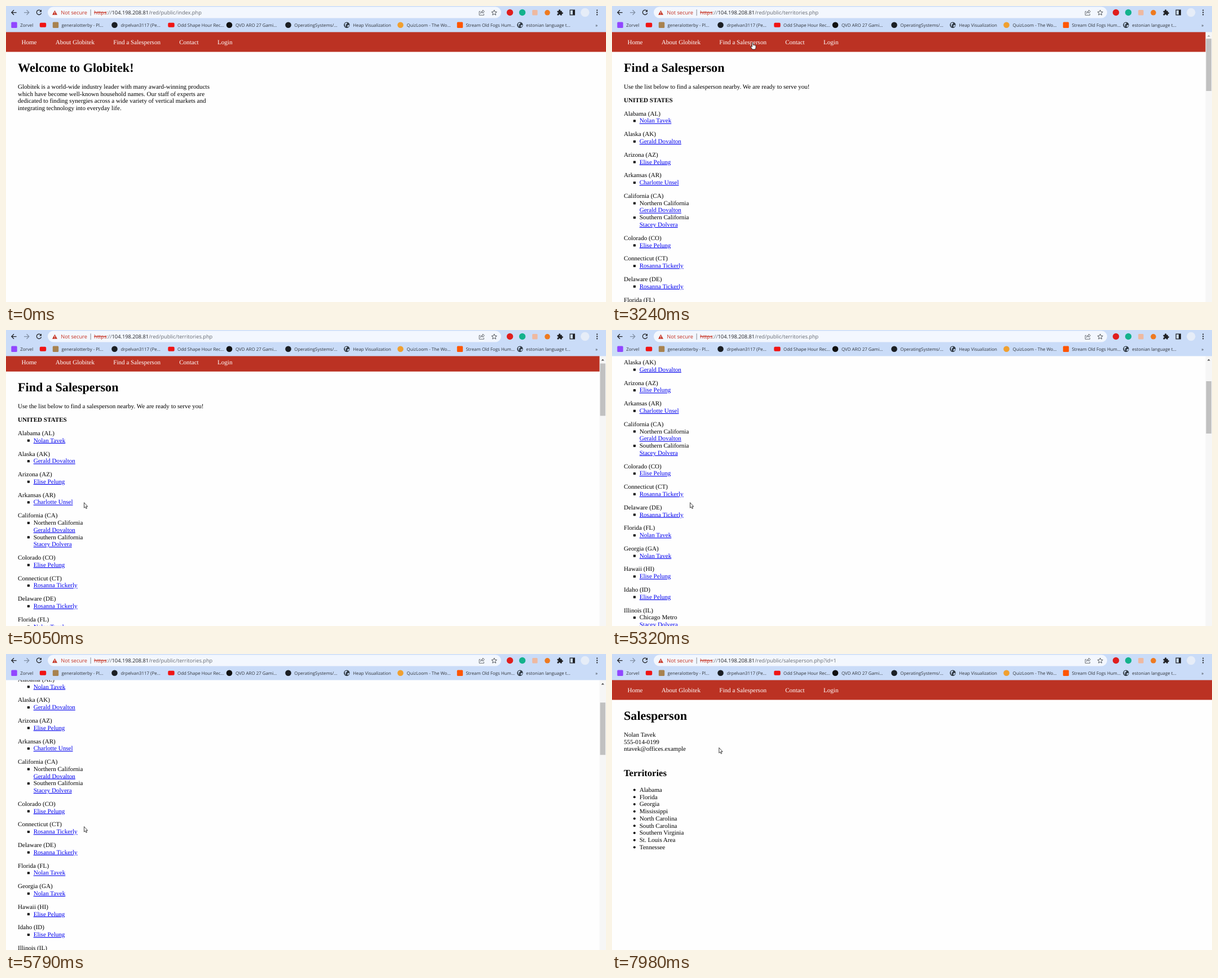
An HTML page that plays this animation: 1064 px wide and 526 px high, repeating every 8 s.

```html
<!DOCTYPE html>
<html lang="en">
<head>
<meta charset="utf-8">
<title>Find a Salesperson</title>
<style>
  html, body { margin: 0; width: 100%; height: 100%; overflow: hidden; background: #fefefe; }
  svg { display: block; width: 1064px; height: 526px; text-rendering: geometricPrecision; }
  .page { font: 11.083px "Liberation Serif", "Times New Roman", serif; }
  .h1 { font-size: 22.167px; font-weight: 700; }
  .h2 { font-size: 16.625px; font-weight: 700; }
  .b { font-weight: 700; }
  .nav { fill: #fff; }
  .link { fill: #00e; text-decoration: underline; }
  .bar { font: 9.25px "Open Sans", "Noto Sans", sans-serif; }
  .mark { font-size: 7.9px; fill: #30343a; }
  .line { fill: none; stroke: #202124; stroke-width: 1.25; }
  .cursor { fill: #fff; stroke: #111; stroke-width: .8; stroke-linejoin: round; }
</style>
</head>
<body>
<svg id="stage" viewBox="0 0 1064 526"></svg>
<script>
const LINE = 12.746, GAP = 11.083, LOOP = 8000;
const text = (x, y, s, c = '') => `<text x="${x}" y="${y}" class="${c}">${s}</text>`;
const rect = (x, y, w, h, fill, r = 0) =>
  `<rect x="${x}" y="${y}" width="${w}" height="${h}" rx="${r}" fill="${fill}"/>`;
const dot = (x, y, r, fill) => `<circle cx="${x}" cy="${y}" r="${r}" fill="${fill}"/>`;
const path = (d, attrs = 'class="line"') => `<path d="${d}" ${attrs}/>`;
const group = (id, body, c = '') => `<g id="${id}" class="${c}">${body}</g>`;

// Web pages
const navItems = [[27.4, 'Home'], [87.7, 'About Globitek'], [190.3, 'Find a Salesperson'],
  [307.2, 'Contact'], [375, 'Login']];
const header = title => rect(0, 46, 1064, 35.5, '#bb3223') +
  navItems.map(([x, s]) => text(x, 68.4, s, 'nav')).join('') + text(21, 116.7, title, 'h1');
const lines = (x, y, rows) => rows.map((s, i) => text(x, y + i * LINE, s)).join('');

const homePage = header('Welcome to Globitek!') + lines(21, 147, [
  'Globitek is a world-wide industry leader with many award-winning products',
  'which have become well-known household names. Our staff of experts are',
  'dedicated to finding synergies across a wide variety of vertical markets and',
  'integrating technology into everyday life.']);

const [nolan, gerald, elise, charlotte, stacey, rosanna] = ['Nolan Tavek', 'Gerald Dovalton',
  'Elise Pelung', 'Charlotte Unsel', 'Stacey Dolvera', 'Rosanna Tickerly'];
const states = [
  ['Alabama (AL)', nolan], ['Alaska (AK)', gerald], ['Arizona (AZ)', elise],
  ['Arkansas (AR)', charlotte],
  ['California (CA)', ['Northern California', gerald], ['Southern California', stacey]],
  ['Colorado (CO)', elise], ['Connecticut (CT)', rosanna], ['Delaware (DE)', rosanna],
  ['Florida (FL)', nolan], ['Georgia (GA)', nolan], ['Hawaii (HI)', elise], ['Idaho (ID)', elise],
  ['Illinois (IL)', ['Chicago Metro', stacey], ['Southern Illinois', nolan]],
  ['Indiana (IN)', stacey]];

function stateList() {
  let y = 194.7, out = '';
  for (const [name, ...areas] of states) {
    out += text(21, y, name);
    for (const area of areas) {
      out += rect(37.9, y + LINE - 5.2, 4, 4, '#000');
      if (Array.isArray(area)) out += text(48.7, y += LINE, area[0]);
      out += text(48.7, y += LINE, Array.isArray(area) ? area[1] : area, 'link');
    }
    y += LINE + GAP;
  }
  return out;
}
const listPage = header('Find a Salesperson') +
  text(21, 147, 'Use the list below to find a salesperson nearby. We are ready to serve you!') +
  text(21, 170.8, 'UNITED STATES', 'b') + stateList();

const areas = ['Alabama', 'Florida', 'Georgia', 'Mississippi', 'North Carolina', 'South Carolina',
  'Southern Virginia', 'St. Louis Area', 'Tennessee'];
const personPage = header('Salesperson') +
  lines(21, 147, [nolan, '555-014-0199', 'ntavek@offices.example']) +
  text(21, 217, 'Territories', 'h2') + lines(48.7, 244.8, areas) +
  areas.map((_, i) => dot(39.8, 241.5 + i * LINE, 2, '#000')).join('');

const scrollbar = rect(1052.5, 46, 11.5, 480, '#f6f6f6') +
  path('M1055.6 54.4L1058.2 51.6 1060.8 54.4Z', 'id="up" fill="#505050"') +
  '<rect id="thumb" x="1053.5" y="58" width="9.4" height="93" fill="#c1c1c1"/>';

// Browser bar
const globe = x => dot(x, 33.8, 5.2, '#303a44') +
  path(`M${x - 3.6} 31.6q2-2.6 4.4-1.6l-1 2.2-2 1 1 1.8-1.4 2.2zM${x + 1.2} 34.4l2.8-1 .4 1.6-2 2.6-1.4-1z`,
    'fill="#cadcf8"');
const square = (x, fill) => rect(x - 5.2, 28.6, 10.4, 10.4, fill, 1.5);
const play = x => rect(x - 5.7, 29.8, 11.4, 8, '#f01414', 2);
const disc = fill => x => dot(x, 33.8, 5.3, fill);
const marks = [
  [14.5, x => square(x, '#9146ff'), 25.3, 'Zorvel'], [65.5, play, 76, ''],
  [88, x => square(x, '#a8824f'), 98.5, 'generalotterby - Pl...'],
  [192.5, disc('#1b1f24'), 203.5, 'drpelvan3117 (Pe...'],
  [293, play, 304, 'Odd Shape Hour Rec...'], [396, disc('#111'), 407, 'QVD ARO 27 Gami...'],
  [500.5, disc('#1b1f24'), 511.3, 'OperatingSystems/...'], [604.3, globe, 615.2, 'Heap Visualization'],
  [699.5, disc('#f0a030'), 710.5, 'QuizLoom - The Wo...'],
  [805, x => square(x, '#ff5500'), 815.5, 'Stream Old Fogs Hum...'],
  [911.5, globe, 922.3, 'estonian language t...']];

const bar = rect(0, 0, 1064, 46.4, '#cadcf8') + rect(74, 1.5, 804, 20, '#f3f7fe', 10) +
  path('M18.6 11.5H10M14 7.3L9.8 11.5 14 15.7') +
  path('M32 11.5h8.6M36.6 7.3l4.2 4.2-4.2 4.2', 'class="line" style="stroke:#8290a5"') +
  group('reload', path('M61.7 8.5A4.2 4.2 0 1 0 62.6 12.4') + path('M63 6.4v4h-4z', 'fill="#202124"')) +
  group('stop', path('M55.2 7.8l7 7M62.2 7.8l-7 7')) +
  path('M86.5 7.7L91 15.8H82Z', 'fill="#c5301f"') + rect(86, 10.4, 1, 2.7, '#f3f7fe') +
  rect(86, 13.7, 1, 1, '#f3f7fe') +
  text(97.2, 15, '<tspan fill="#c5301f">Not secure</tspan>') + rect(149.7, 6.2, .8, 11, '#6c7178') +
  '<text x="156" y="15" fill="#666b72"><tspan fill="#c5301f" text-decoration="line-through">https</tspan>://' +
  '<tspan fill="#202124">104.198.208.81</tspan><tspan id="path"></tspan></text>' +
  path('M841.2 9.6h-2v6.7h8.2v-2.5M841.5 13.2q.4-4 4-4.2V7l3 3-3 2.8v-1.9q-2.5 0-4 2.3z',
    'fill="none" stroke="#5c6066" stroke-width=".9"') +
  path('M865.7 7l1.3 3.2 3.4.3-2.6 2.2.8 3.4-2.9-1.8-2.9 1.8.8-3.4-2.6-2.2 3.4-.3z',
    'fill="none" stroke="#4a4e54" stroke-width=".95"') +
  dot(893.6, 11.5, 5.7, '#e01e1e') + dot(915.6, 11.5, 5.7, '#14b28c') +
  rect(933.2, 7, 9.4, 9.6, '#eeb9a0', 1.5) + dot(960, 11.8, 4.8, '#ee7a20') +
  path('M977.6 8.8h2.6q-.5-2.6 1.5-2.6t1.5 2.6h2.6v2.6q2.2-.4 2.2 1.2t-2.2 1.3v2.7h-2.8q0-1.9-1.4-1.9t-1.4 1.9h-2.6v-2.8q1.9 0 1.9-1.3t-1.9-1.3z',
    'fill="#202124"') +
  path('M1000.2 7.2h8.2v8.6h-8.2z') + rect(1005, 7.2, 3.6, 8.6, '#202124') +
  dot(1026.8, 11.5, 7.7, '#e6edf8') +
  [7.6, 11.5, 15.4].map(y => dot(1048.2, y, 1.15, '#202124')).join('') +
  marks.map(([x, icon, tx, s]) => icon(x) + text(tx, 36.8, s, 'mark')).join('') +
  text(1045.3, 36.6, '»', 'mark');

const cursors =
  group('arrow', path('M0 0V9.4L2.1 7.5 3.5 10.8 5 10.1 3.6 7H6.3Z', ''), 'cursor') +
  group('hand', path('M-1 1.2Q0-.6 1 1.2V4.8Q4.6 4.5 5.8 6V9Q5.6 11 4.6 12.5H-.4L-3.2 8.3Q-3.4 6.8-2 7.2L-1 8.2Z', ''), 'cursor') +
  group('beam', path('M-1.7-5.5H1.7M0-5.5V5.5M-1.7 5.5H1.7', 'fill="none"'), 'cursor');

document.getElementById('stage').innerHTML = rect(0, 0, 1064, 526, '#fefefe') +
  group('home', homePage, 'page') + group('list', listPage, 'page') + group('person', personPage, 'page') +
  group('scroll', scrollbar) + group('bar', bar, 'bar') + cursors;

// Motion: [step, values...], screen updates come 15 times a second
const moves = [
  [0, 699, 363], [1, 620, 275], [2, 539, 196], [4, 539, 196], [5, 430, 160], [6, 325, 134],
  [7, 255, 117], [9, 255, 117], [10, 237, 115], [12, 150, 115], [13, 108, 119], [14, 91, 123],
  [18, 91, 123], [20, 98, 101], [22, 122, 68], [25, 205, 62], [28, 282, 64], [31, 262, 67],
  [34, 250, 66], [36, 250, 66], [39, 249.3, 64.5], [50, 249.3, 64.5], [53, 190, 112], [57, 92, 188],
  [60, 63, 258], [63, 88, 298], [64, 98, 350], [65, 122, 450], [66, 147, 511], [67, 146, 430],
  [68, 141, 335], [69, 138.5, 306.7], [90, 138.5, 306.7], [93, 112, 245], [96, 84, 200],
  [98, 84, 200], [101, 70, 190], [109, 70, 190], [112, 105, 182], [116, 189.8, 166.5]];
const scrolls = [[71, 0], [72, 7.7], [73, 30], [74, 76], [75, 127], [76, 170.2], [77, 193], [78, 204],
  [79, 207], [80, 203], [81, 192], [82, 172], [83, 145.9], [85, 95], [87, 58], [89, 36], [92, 23], [95, 19.4]];
const shapes = [[0, 'arrow'], [11, 'beam'], [13, 'arrow'], [22, 'hand'], [51, 'arrow'], [100, 'hand'], [110, 'arrow']];

function at(keys, n) {
  const i = keys.findIndex(k => k[0] >= n);
  if (i < 0) return keys[keys.length - 1].slice(1);
  if (!i) return keys[0].slice(1);
  const [a, b] = [keys[i - 1], keys[i]], f = (n - a[0]) / (b[0] - a[0]);
  return a.slice(1).map((v, j) => v + (b[j + 1] - v) * f);
}
const $ = id => document.getElementById(id);
const show = (id, on) => $(id).style.display = on ? '' : 'none';
const urls = { home: 'index.php', list: 'territories.php', person: 'salesperson.php?id=1' };

function draw(t) {
  const n = Math.floor((t - 240) / 66.6 + .1);
  const page = t < 3180 ? 'home' : t < 7120 ? 'list' : 'person';
  for (const id in urls) show(id, id === page);
  $('path').textContent = '/red/public/' + urls[page];

  const [top] = at(scrolls, n);
  $('list').setAttribute('transform', `translate(0 ${-top})`);
  $('thumb').setAttribute('y', 58 + top * .194);
  $('up').setAttribute('fill', top ? '#505050' : '#a3a3a3');
  show('scroll', page === 'list');

  const loading = t >= 2820 && t < 3240 || t >= 6990 && t < 7190;
  show('stop', loading);
  show('reload', !loading);

  const shape = shapes.reduce((s, k) => n >= k[0] ? k[1] : s, '');
  const [x, y] = at(moves, n);
  for (const id of ['arrow', 'hand', 'beam']) {
    show(id, id === shape);
    $(id).setAttribute('transform', `translate(${x} ${y})`);
  }
}
const start = performance.now();
function tick() {
  draw((performance.now() - start) % LOOP);
  requestAnimationFrame(tick);
}
tick();
</script>
</body>
</html>
```
